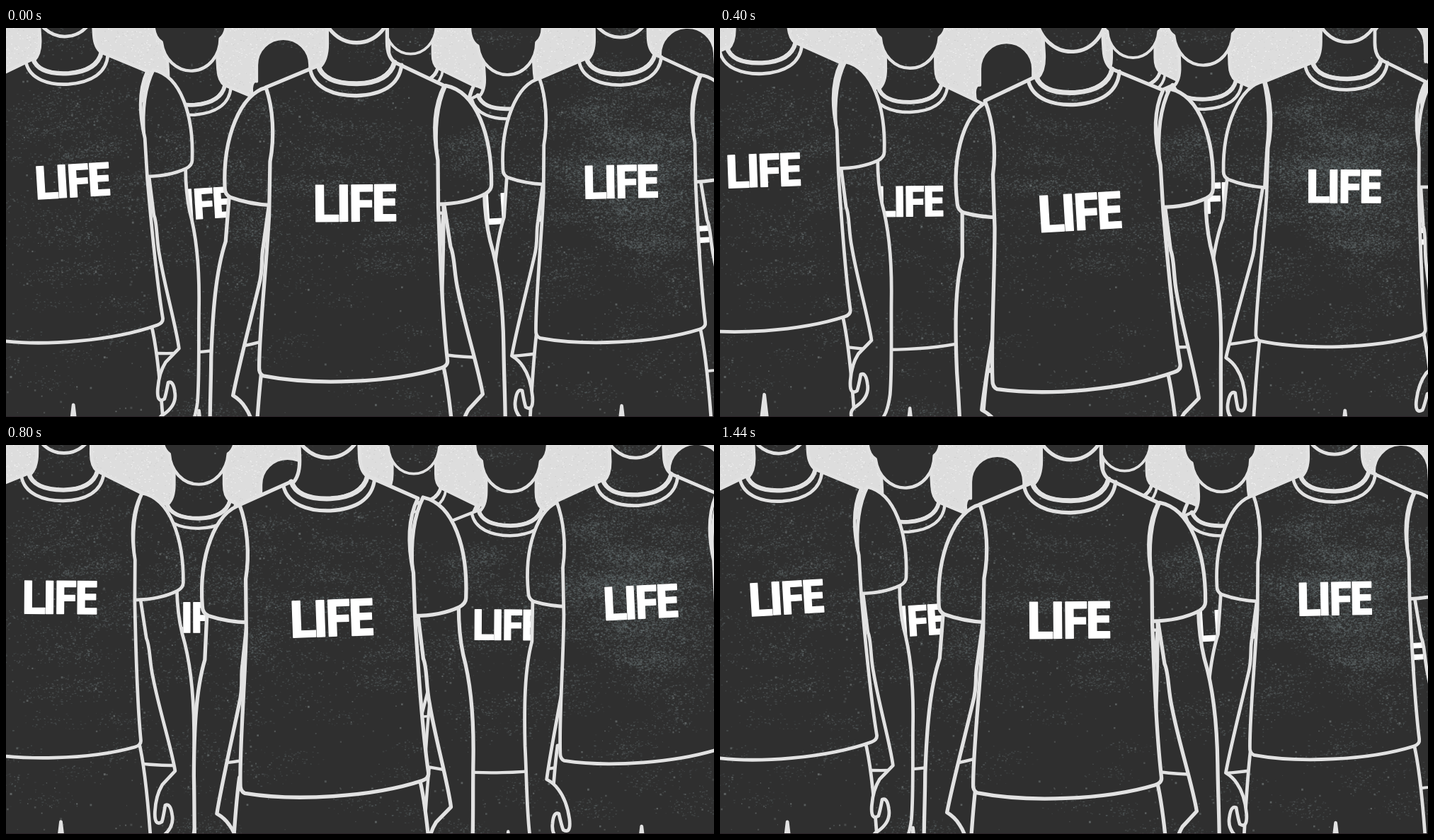
An HTML page with a canvas for the animation above (1.48 s loop, 1000 by 550 pixels).

```html
<!DOCTYPE html>
<html lang="en">
<head>
<meta charset="utf-8">
<title>Life shirts</title>
<style>
html, body { margin: 0; width: 100%; height: 100%; overflow: hidden; background: #dcdcdc; }
canvas { display: block; }
</style>
</head>
<body>
<canvas id="stage" width="1000" height="550"></canvas>
<script>
const W = 1000, H = 550, LOOP = 1480, STEP = 40;
const CYCLE = LOOP - STEP; // the last picture repeats the first
const DARK = '#2f2f2f', LIGHT = '#e2e2e2';
const ctx = document.getElementById('stage').getContext('2d');

// Body parts, drawn around the middle of the chest lettering
const CX = 494, CY = 244;
const path = d => new Path2D(d);
const HEAD = path('M497 18C470 18 449 -5 447 -34Q435 -42 435 -64Q436 -80 445 -78V-110C445 -139 468 -162 497 -162C526 -162 549 -139 549 -110V-78Q558 -80 559 -64Q559 -42 547 -34C545 -5 524 18 497 18Z');
const NECK = path('M455 -30V18Q455 42 444 52Q450 75 497 76Q540 74 550 46Q540 38 540 18V-30Z');
const TORSO = path('M368 80L442 50Q450 76 497 76Q542 75 550 46L620 80C604 110 604 150 610 185L610 250C612 320 614 400 621 468Q622 476 612 479C540 500 430 502 361 488Q354 485 355 474C356 420 366 340 371 260L373 185C380 150 378 110 368 80Z');
const NECKLINE = path('M442 50Q450 76 497 76Q542 75 550 46');
const COLLAR = path('M431 56C436 82 465 93 496 93C530 92 556 80 560 50');
const LEGS = path('M362 470Q352 540 342 800H470L494 597L518 800H644Q634 540 616 470Z');
const LEFT = {
  pivot: [354, -200],
  arm: path('M312 232L306 297C291 340 286 400 283 460C282 510 278 560 280 600Q284 640 300 642Q318 652 336 645Q346 628 332 620Q313 605 317 585Q320 566 328 570Q331 590 333 596Q345 604 344 580Q342 550 330 532Q324 522 313 515C320 480 338 415 352 360C359 335 355 325 359 305L369 240Z'),
  sleeve: path('M368 80C330 88 304 150 306 222Q306 231 314 235Q340 245 371 247L374 185Q380 130 368 80Z')
};
const RIGHT = {
  pivot: [640, 180],
  arm: path('M676 230C677 262 680 280 685 300C699 345 704 400 705 450C706 500 710 560 708 600Q704 640 690 642Q671 652 652 645Q642 628 656 620Q676 605 672 585Q669 566 661 570Q658 590 656 596Q644 604 645 580Q646 555 656 538L676 516C670 480 650 420 640 370C634 345 635 320 629 308L618 240Z'),
  sleeve: path('M620 80C664 88 686 150 686 220Q686 228 677 233Q650 247 610 248L609 185Q602 120 620 80Z')
};

// From back to front. sway and step: [size, phase] of the slow and the fast
// sideways wave; bob, lean, leftArm and rightArm: phases in degrees
const crowd = [
  { scale: .72, x: 394, y: 311, sway: [9, 120], bob: 127 },
  { scale: .72, x: 573, y: 203, sway: [8.5, 115], bob: 127 },
  { scale: .74, x: 969, y: 293, sway: [3, 310], step: [6, 345], bob: 10, lean: 185 },
  { scale: .83, x: 273, y: 245, sway: [8, 280], step: [5, 250], bob: 295, lean: 160 },
  { scale: .83, x: 705, y: 247, sway: [9, 294], step: [12, 334], bob: 22, lean: 200 },
  { scale: .9, x: 79, y: 208, sway: [13, 316], step: [7, 347], bob: 16, lean: 203, rightArm: 30 },
  { scale: .9, x: 883.5, y: 221, sway: [12.6, 193], step: [5, 109], bob: 127, lean: 75, leftArm: 250 },
  { scale: 1, x: 486, y: 252, sway: [25, 59], step: [5, 209], bob: 231, lean: 303 }
];

const radians = degrees => degrees * Math.PI / 180;
const wave = (angle, [size, phase]) => size * Math.cos(radians(angle - phase));

function shape(p) {
  ctx.fill(p);
  ctx.stroke(p);
}

function rotate(degrees, x, y) {
  ctx.translate(x, y);
  ctx.rotate(radians(degrees));
  ctx.translate(-x, -y);
}

function drawLimb({ pivot, arm, sleeve }, degrees) {
  ctx.save();
  rotate(degrees, ...pivot);
  shape(arm);
  shape(sleeve);
  ctx.restore();
}

function drawWalker(walker, angle) {
  const { scale, x, y, sway, step = [0, 0], bob, lean, leftArm = 105, rightArm = 135 } = walker;
  ctx.save();
  ctx.translate(x + wave(angle, sway) + wave(2 * angle, step), y + wave(2 * angle, [8.3 * scale, bob]));
  ctx.scale(scale, scale);
  ctx.translate(-CX, -CY);
  ctx.fillStyle = DARK;
  ctx.strokeStyle = LIGHT;
  ctx.lineWidth = 5.3;
  shape(LEGS);
  if (lean) rotate(wave(angle, [2, lean]) - 1.6, CX, CY);
  drawLimb(LEFT, -.7 - wave(angle, [1.25, leftArm]));
  drawLimb(RIGHT, 3 + wave(angle, [2.9, rightArm]));
  shape(NECK);
  shape(HEAD);
  shape(TORSO);
  ctx.stroke(COLLAR);
  ctx.lineWidth = 7;
  ctx.stroke(NECKLINE);
  ctx.fillStyle = ctx.strokeStyle = '#fff';
  ctx.lineWidth = 1.5;
  ctx.fillText('LIFE', CX - 5, CY + 26.5);
  ctx.strokeText('LIFE', CX - 5, CY + 26.5);
  ctx.restore();
}

// Fixed print grain
let seed = 7;
function random() {
  seed = (seed * 16807) % 2147483647;
  return seed / 2147483647;
}
const spread = () => random() + random() + random() - 1.5;

function layer(paint) {
  const canvas = document.createElement('canvas');
  canvas.width = W;
  canvas.height = H;
  paint(canvas.getContext('2d'));
  return canvas;
}

const paper = layer(g => {
  g.fillStyle = '#dddddd';
  g.fillRect(0, 0, W, H);
  for (let i = 0; i < 3500; i++) {
    g.fillStyle = random() < .7 ? '#f2f2f2' : '#cfcfcf';
    g.fillRect(random() * W, random() * 110, 1 + random(), 1);
  }
});

const grain = layer(g => {
  for (let i = 0; i < 540; i++) {
    const patch = i % 3;
    const x = patch ? random() * W : 900 + spread() * 110;
    const y = patch === 1 ? 210 + spread() * 130 : patch ? random() * H : 220 + spread() * 130;
    for (let j = 0; j < 50; j++) {
      g.fillStyle = `rgba(112,124,126,${.1 + random() * .3})`;
      g.fillRect(x + spread() * 40, y + spread() * 14, 1 + random() * 2, 1 + random());
    }
  }
  for (let i = 0; i < 600; i++) {
    g.fillStyle = `rgba(130,138,138,${.2 + random() * .4})`;
    const size = 1 + random() * 2;
    g.fillRect(random() * W, random() * H, size, size);
  }
});

ctx.lineJoin = ctx.lineCap = 'round';
ctx.font = 'bold 72px "Open Sans", sans-serif';
ctx.letterSpacing = '-7px';
ctx.textAlign = 'center';

function draw() {
  const time = Math.floor(performance.now() % LOOP / STEP) * STEP;
  ctx.drawImage(paper, 0, 0);
  for (const walker of crowd) drawWalker(walker, 360 * time / CYCLE);
  ctx.globalCompositeOperation = 'lighten';
  ctx.drawImage(grain, 0, 0);
  ctx.globalCompositeOperation = 'source-over';
  ctx.fillStyle = '#2a2126';
  ctx.fillRect(0, H - 1, W, 1);
  requestAnimationFrame(draw);
}
draw();
</script>
</body>
</html>
```
